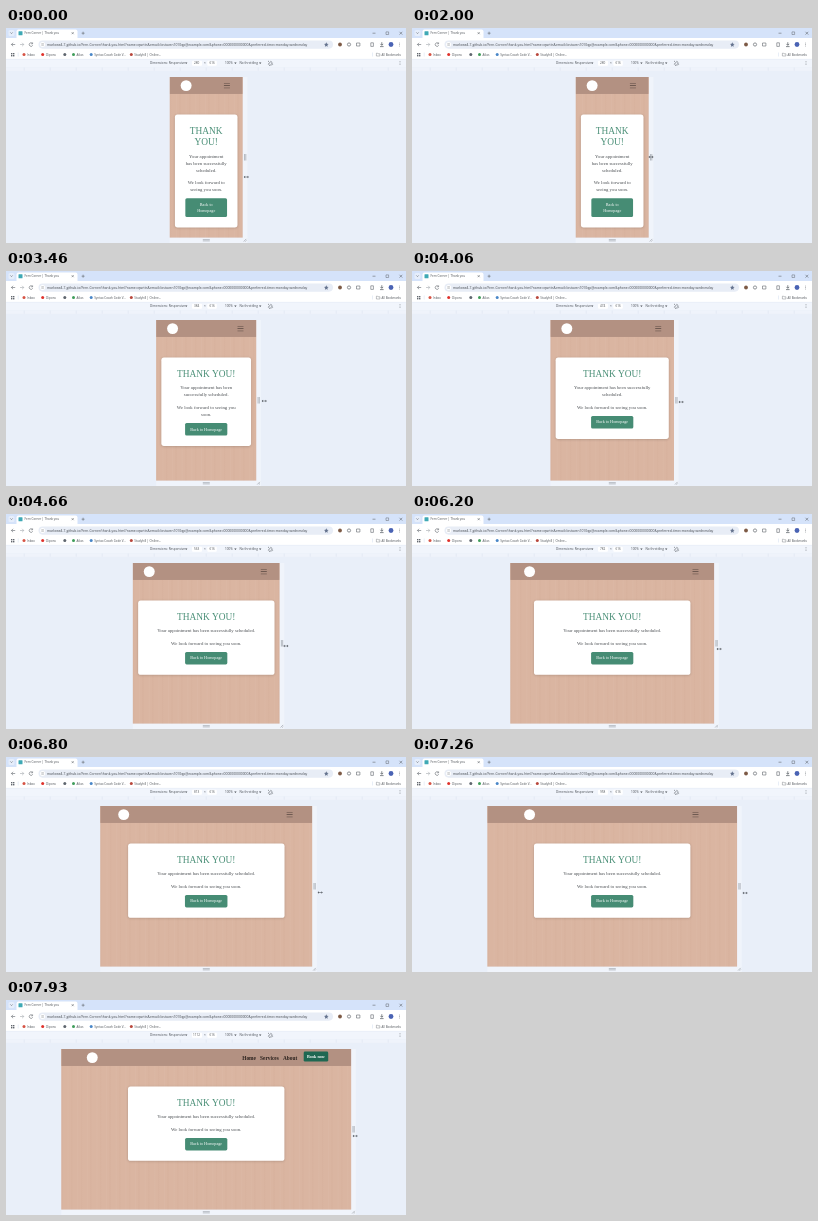
An HTML page that plays this animation: 400 by 215 pixels, repeating every 8000 ms.

```html
<!DOCTYPE html>
<html lang="en">
<head>
<meta charset="utf-8">
<title>Fern Corner | Thank you</title>
<style>
  html, body { margin: 0; width: 100%; height: 100%; overflow: hidden; }
  #stage { position: relative; width: 400px; height: 215px; overflow: hidden; background: #e9eff9; }
  svg { position: absolute; left: 0; top: 0; width: 400px; height: 215px; }
  svg text { font-family: "Open Sans", "Noto Sans", sans-serif; }

  /* The page is laid out at full size and shown at the emulator's zoom. */
  #page {
    position: absolute; left: 0; top: 49px; height: 616px; overflow: hidden;
    transform-origin: 0 0;
    font: 18.3px/27px "Liberation Serif", "Times New Roman", serif; color: #4a4e52;
    background:
      repeating-linear-gradient(90deg, #a56f5508 0 4px, #fff0 8px 22px, #ffffff08 26px, #fff0 30px 37px),
      #dab5a1;
  }
  #nav { position: absolute; left: 0; right: 0; top: 0; height: 65px; background: #b39182; }
  #box { position: absolute; top: 0; height: 65px; }
  #logo { position: absolute; left: 10px; top: 12px; width: 42px; height: 42px; border-radius: 50%; background: #fff; }
  #burger {
    position: absolute; right: 17px; top: 23px; width: 23px; height: 20px; box-sizing: border-box;
    border: solid #5d4b44; border-width: 2.5px 0;
  }
  #burger::after { content: ""; position: absolute; left: 0; right: 0; top: 6.3px; height: 2.5px; background: #5d4b44; }
  #links { position: absolute; right: 0; top: 10px; display: flex; white-space: nowrap; font-weight: bold; font-size: 20.5px; color: #2a211d; }
  #links span { margin: 9px 0 0 16px; line-height: 30px; }
  #links b { box-sizing: border-box; width: 94px; height: 38px; margin-left: 25px; border-radius: 5px; background: #1f6852; color: #fff; font-size: 16px; line-height: 37px; text-align: center; }
  #card {
    position: absolute; left: 50%; top: 144px; width: calc(100% - 40px); max-width: 600px;
    box-sizing: border-box; padding: 40px; transform: translateX(-50%);
    border-radius: 10px; background: #fff; box-shadow: 0 2px 10px #0003; text-align: center;
  }
  #card h1 { margin: 0 0 20px; font-weight: normal; font-size: 36px; line-height: 43px; color: #4a8f77; }
  #card p { margin: 0 0 20px; }
  #card a {
    display: inline-block; box-sizing: border-box; max-width: 100%; padding: 12px 20px; vertical-align: top;
    border-radius: 6px; background: #468c74; color: #fff; font-size: 16px; line-height: 24px;
  }
</style>
</head>
<body>
<div id="stage">
  <svg id="chrome" viewBox="0 0 400 215"></svg>
  <div id="page">
    <div id="nav"><div id="box">
      <div id="logo"></div>
      <div id="burger"></div>
      <div id="links"><span>Home</span><span>Services</span><span>About</span><b>Book now</b></div>
    </div></div>
    <div id="card">
      <h1>THANK YOU!</h1>
      <p>Your appointment has been successfully scheduled.</p>
      <p>We look forward to seeing you soon.</p>
      <a>Back to Homepage</a>
    </div>
  </div>
  <svg id="over" viewBox="0 0 400 215"></svg>
</div>
<script>
const LOOP = 8000, ZOOM = 0.2607, MID = 200.2;
const $ = id => document.getElementById(id);

function add(parent, tag, attrs, text) {
  const el = document.createElementNS("http://www.w3.org/2000/svg", tag);
  for (const k in attrs) el.setAttribute(k, attrs[k]);
  if (text) el.textContent = text;
  return parent.appendChild(el);
}
const chrome = $("chrome"), over = $("over");
const rect = (x, y, width, height, fill, rx = 0, to = chrome) => add(to, "rect", { x, y, width, height, fill, rx });
const dot = (cx, cy, r, fill) => add(chrome, "circle", { cx, cy, r, fill });
const line = (d, stroke = "#62676e", w = 0.6, to = chrome) =>
  add(to, "path", { d, stroke, "stroke-width": w, fill: "none" });
const label = (x, y, text, size = 3.2, fill = "#484d53") =>
  add(chrome, "text", { x, y, "font-size": size, fill }, text);
const arrowDown = (x, y) => add(chrome, "path", { d: `M${x} ${y}h2.4l-1.2 1.7z`, fill: "#484d53" });
const dots = (x, y) => [-1.5, 0, 1.5].forEach(d => dot(x, y + d, 0.4, "#62676e"));

function drawTabs() {
  rect(0, 0, 400, 11, "#d5e3fa");
  rect(2.5, 2, 6, 6, "#e6eefb", 1.6);
  line("M4.3 4.4l1.2 1.2 1.2-1.2");
  rect(10.5, 1.5, 61, 11, "#fff", 2);
  rect(12.5, 3.3, 4, 4, "#3fa9b5", 0.5);
  label(18.5, 6.4, "Fern Corner | Thank you", 3);
  line("M65.7 4.2l2 2m0-2l-2 2M75.6 5.2h3m-1.5-1.5v3M366.5 5.2h3M393.5 3.8l2.8 2.8m0-2.8l-2.8 2.8");
  line("M380 3.9h2.6v2.6h-2.6z", "#62676e", 0.5);
}

function drawAddress() {
  rect(0, 10, 400, 21.5, "#fff");
  line("M9.2 16.5h-3.8m1.7-1.7l-1.7 1.7 1.7 1.7");
  line("M14 16.5h3.8m-1.7-1.7l1.7 1.7-1.7 1.7", "#a7abb0");
  line("M26.4 15.4a1.8 1.8 0 1 0 .3 1.8M26.6 14.4v1.4h-1.4");
  rect(32.5, 12.4, 294.5, 8.3, "#e8edf6", 4.1);
  dot(36.6, 16.5, 2.5, "#fff");
  line("M35.3 15.8h2.6m-2.6 1.4h2.6", "#62676e", 0.4);
  label(41, 17.7, "marlowe4-7.github.io/Fern-Corner/thank-you.html?name=qwrtts&email=lostaven1010qp@example.com&phone=0000000000000&preferred-time=monday-wednesday", 3.35, "#44494f");
  add(chrome, "path", { d: "M320.3 14.3l.7 1.5 1.6.2-1.2 1.1.3 1.7-1.4-.8-1.4.8.3-1.7-1.2-1.1 1.6-.2z", fill: "#66748f" });
  dot(334, 16.5, 1.9, "#7d5a45");
  add(chrome, "circle", { cx: 343, cy: 16.5, r: 1.6, fill: "none", stroke: "#62676e", "stroke-width": 0.7 });
  line("M350.5 15h3.4v3h-3.4z");
  line("M364.8 14.8h2.6v3.6h-2.6z");
  line("M375.8 14.2v3m-1.4-1.3l1.4 1.4 1.4-1.4M374 18.6h3.6", "#50565e", 0.7);
  dot(385, 16.5, 2.4, "#4a63b4");
  dots(393.5, 16.5);
}

function drawBookmarks() {
  for (let i = 0; i < 4; i++) rect(5 + (i % 2) * 2, 25 + (i >> 1) * 2, 1.4, 1.4, "#62676e");
  line("M12.2 24.5v4", "#c5d3ea", 0.4);
  [[18, "#d65445", "Inbox"], [36.7, "#e0322c", "Clipora"], [58.8, "#5f666e", ""], [67.5, "#3f9d5a", "Atlas"],
   [85.2, "#4a87c8", "Syntax Coach Code V..."], [125.3, "#b9483d", "Studyhill | Online..."]]
    .forEach(([x, color, name]) => { dot(x, 26.5, 1.5, color); label(x + 3, 27.6, name, 3); });
  line("M366.5 24.5v4", "#c5d3ea", 0.4);
  line("M370.4 25.2h1.2l.5.6h1.8v2.2h-3.5z", "#62676e", 0.4);
  label(375.6, 27.6, "All Bookmarks", 2.9);
}

function drawToolbar() {
  rect(0, 31.2, 400, 8.2, "#f1f5fc");
  line("M0 31.3h400", "#dbe4f2", 0.4);
  label(144, 36.3, "Dimensions: Responsive", 3.1);
  arrowDown(179, 34.4);
  rect(186, 32.8, 10, 5, "#fff", 1);
  rect(201.3, 32.8, 9.5, 5, "#fff", 1);
  label(198, 36.2, "×", 3);
  label(203.4, 36.3, "616", 3.1);
  label(219, 36.3, "100%", 3.1);
  arrowDown(228.2, 34.4);
  label(233.5, 36.3, "No throttling", 3.1);
  arrowDown(253, 34.4);
  line("M262.4 36.2l2.4-2.8 1.6 1.5-2.4 2.8zM262 33.8l1-.9M266.8 36.3l-1 1", "#50555b", 0.6);
  dots(394, 35);
  rect(0, 39.4, 400, 3.4, "#eff3fb");
  for (let x = 18.2; x < 400; x += 26) line(`M${x} 39.6v3`, "#dfe6f2", 0.7);
}

drawTabs();
drawAddress();
drawBookmarks();
drawToolbar();
const sizeText = label(188, 36.3, "280", 3.1);
const sideBar = rect(0, 49, 4.7, 161, "#f0f4fb");
const footBar = rect(0, 209.6, 0, 5.4, "#f0f4fb");
line("M196.8 211.6h7m-7 1.3h7", "#858b93", 0.5);

const grip = add(over, "g", {});
line("M1.8 126v6.5M3.1 126v6.5", "#7c828a", 0.5, grip);
line("M1 213.5l2.6-2.6M2.6 213.6l1.1-1.1", "#7c828a", 0.5, grip);
const cursor = add(over, "g", {});
line("M-2 0h4", "#5a5f66", 0.6, cursor);
add(cursor, "path", { d: "M-2.6 0l1.4-1.2v2.4zM2.6 0l-1.4-1.2v2.4z", fill: "#5a5f66" });

// time, viewport width, pointer distance from its right edge, pointer height
const steps = [
  [0, 280, 3.6, 149], [400, 280, 3.6, 149], [1700, 280, 2.3, 129], [3060, 280, 2.3, 129],
  [3260, 324, 7, 129.5], [3460, 384, 8, 130], [4660, 563, 6.3, 132], [5900, 781, 5, 135],
  [6450, 782, 5, 135], [6800, 813, 8, 135.5], [7260, 958, 8, 136], [7660, 1044, 7, 136],
  [7930, 1112, 4, 136], [LOOP, 1114, 4, 136]
];

function poseAt(t) {
  const i = steps.findIndex(s => s[0] > t), a = steps[i - 1], b = steps[i];
  const k = (t - a[0]) / (b[0] - a[0]);
  return a.slice(1).map((v, n) => v + (b[n + 1] - v) * k);
}

const containerWidth = w => w >= 992 ? 960 : w >= 768 ? 720 : w >= 576 ? 540 : w - 40;

function draw(t) {
  const [raw, dx, y] = poseAt(t);
  const w = Math.round(raw), shown = w * ZOOM;
  const left = MID - shown / 2, right = MID + shown / 2;
  const inner = Math.min(containerWidth(w), w - 40) - 24;

  $("page").style.width = w + "px";
  $("page").style.transform = `translateX(${left}px) scale(${ZOOM})`;
  $("box").style.width = inner + "px";
  $("box").style.left = (w - inner) / 2 + "px";
  $("burger").style.display = w < 992 ? "block" : "none";
  $("links").style.display = w < 992 ? "none" : "flex";

  sizeText.textContent = w;
  sizeText.setAttribute("x", w > 999 ? 187 : 188);
  sideBar.setAttribute("x", right);
  footBar.setAttribute("x", left);
  footBar.setAttribute("width", shown + 4.7);
  grip.setAttribute("transform", `translate(${right} 0)`);
  cursor.setAttribute("transform", `translate(${right + dx} ${y})`);
}

const start = performance.now();
function tick() {
  draw((performance.now() - start) % LOOP);
  requestAnimationFrame(tick);
}
tick();
</script>
</body>
</html>
```
